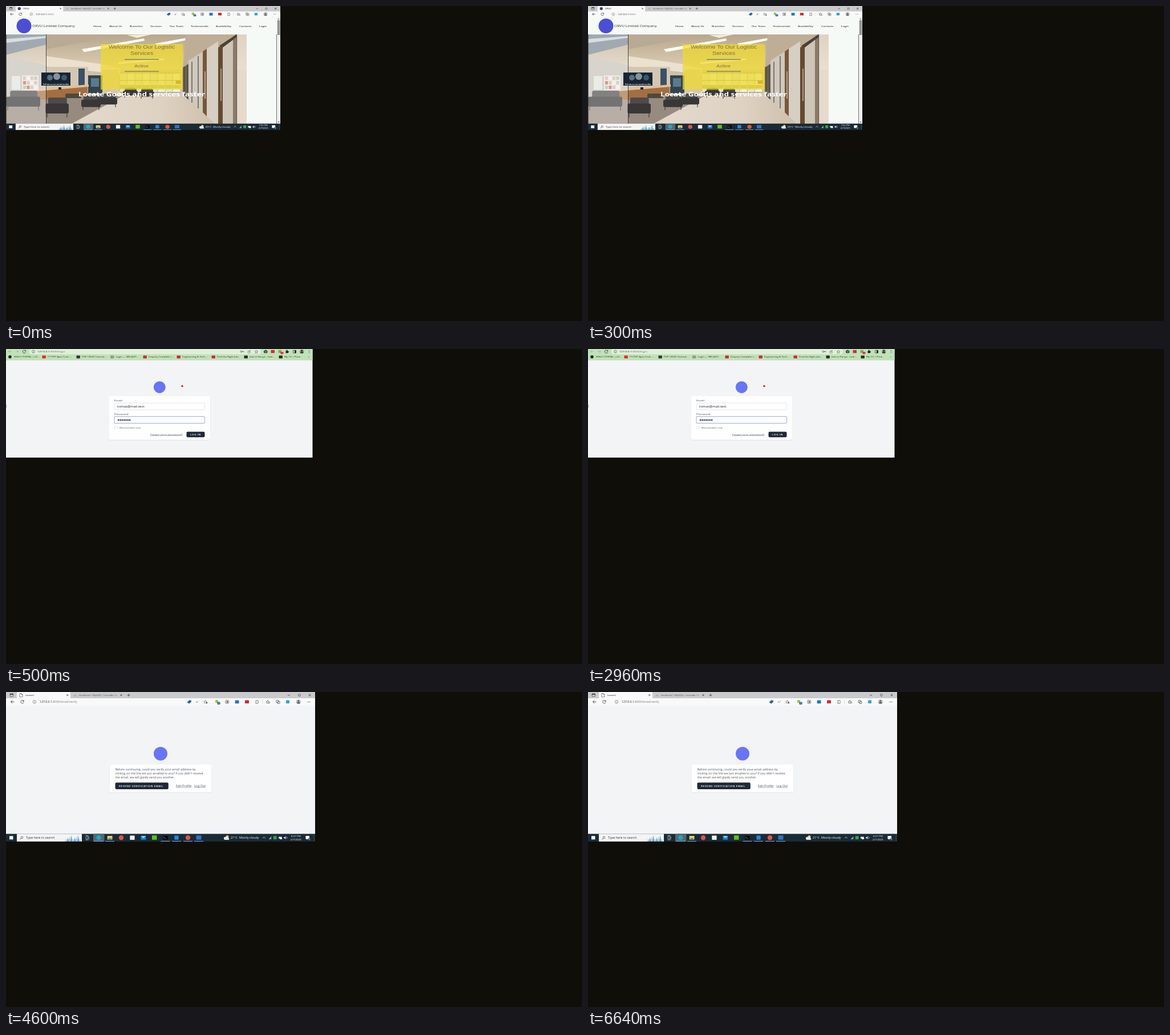
Recreate the animation shown at these times as an HTML page. Size 1010x554 px, loop 8 s.

```html
<!DOCTYPE html>
<html lang="en">
<head>
<meta charset="utf-8">
<style>
html, body { margin: 0; width: 100%; height: 100%; overflow: hidden; background: #0f0e09; }
svg { display: block; width: 1010px; height: 554px; font-family: "Open Sans", sans-serif; }
text { white-space: pre; }
</style>
</head>
<body>
<svg id="stage" viewBox="0 0 1010 554"></svg>
<script>
// Each screen is shown flattened; this is its height-to-width ratio.
let aspect = 1;
const rect = (x, y, w, h, fill, more = '') =>
  `<rect x="${x}" y="${y}" width="${w}" height="${h}" fill="${fill}" ${more}/>`;
const dot = (x, y, r, fill) => `<circle cx="${x}" cy="${y}" r="${r}" fill="${fill}"/>`;
const line = (d, color = '#333', width = 0.7) =>
  `<path d="${d}" fill="none" stroke="${color}" stroke-width="${width}"/>`;
const poly = (points, fill) => `<polygon points="${points}" fill="${fill}"/>`;
const text = (x, y, size, str, fill = '#333', more = '') =>
  `<text transform="translate(${x} ${y}) scale(1 ${aspect})" font-size="${size}" fill="${fill}" ${more}>${str}</text>`;
const box = (x, y, w, h, color = '#444') => rect(x, y, w, h, 'none', `stroke="${color}" stroke-width=".7" rx=".8"`);
const ring = (x, y, r, color = '#444') =>
  `<circle cx="${x}" cy="${y}" r="${r}" fill="none" stroke="${color}" stroke-width=".7"/>`;
const cross = (x, y, s, color) => line(`M${x - s} ${y - s}l${2 * s} ${2 * s}m0 ${-2 * s}l${-2 * s} ${2 * s}`, color, 0.8);
const reload = (x, y) => line(`M${x + 2.3} ${y - 1.4}A2.7 2.7 0 1 0 ${x + 2.6} ${y + 0.8}M${x + 2.7} ${y - 2.8}v2h-2`, '#333', 0.8);
const star = (x, y, color = '#555') =>
  line(`M${x} ${y - 2.8}l.9 1.9 2 .2-1.5 1.4.4 2-1.8-1-1.8 1 .4-2-1.5-1.4 2-.2z`, color, 0.6);
const dots = (x, y, dx, dy) => [-1, 0, 1].map(i => dot(x + i * dx, y + i * dy, 0.6, '#333')).join('');
const middle = 'text-anchor="middle"';
const bold = 'font-weight="600"';
const dark = '#1f2937', grey = '#4b5563', indigo = '#6875f5';

const button = (x, y, w, h, size, label) => rect(x, y, w, h, dark, 'rx="2.2"') +
  text(x + 6.6, y + h / 2 + size * aspect * 0.36, size, label, '#fff', `${bold} letter-spacing=".1em"`);
const link = (x, y, size, label) => text(x, y, size, label, grey, 'text-decoration="underline"');
const card = (x, y, w, h) => rect(x, y + 1, w, h, '#000', 'rx="3.5" opacity=".06"') +
  rect(x - 0.5, y + 0.5, w + 1, h, '#000', 'rx="3.5" opacity=".04"') + rect(x, y, w, h, '#fff', 'rx="3.5"');

function tabBar(title, icon, path) {
  return rect(0, 0, 542, 11, '#c9cacb') + box(7, 3, 5.5, 5) + rect(7, 3, 5.5, 1.6, '#333') +
    rect(19, 0, 94, 12, '#f9f9f9', 'rx="1.5"') + icon +
    text(33.5, 7, 4.6, title, '#222') + cross(107.7, 5.5, 1.4, '#222') +
    poly('117,7.5 121,4 125,7.5', '#b0b0b0') +
    text(128, 7, 4.8, 'localhost / MySQL / orvudb / c', '#555') + cross(202, 5.5, 1.4, '#222') +
    line('M212.5 5.5h5M215 3v5') + line('M494 5.7h4') + box(512.7, 3.8, 3.4, 3.4) + cross(532.6, 5.5, 1.8, '#222') +
    rect(0, 11, 542, 13, '#f9f9f9') + line('M14.5 17.3h-6l2.8-2.6m-2.8 2.6l2.8 2.6', '#333', 0.8) + reload(28.5, 17.3) +
    ring(50, 17.3, 2.8, '#777') + line('M50 16.8v2.1m0-3.4v.6', '#666') +
    text(59, 18.9, 5.2, `127.0.0.1<tspan fill="#7a7a7a">:8000${path}</tspan>`, '#222') +
    poly('317.5,18 321.5,14.3 325,15 324.5,18 321,20.5', '#1668c1') +
    text(333, 19, 5, 'A', '#777') + line('M337 15q1.5 1 0 2', '#777', 0.5) + star(349.5, 17.2) + dot(352, 19, 1.3, '#555') +
    rect(367, 14, 5, 5, '#a8c431', 'rx="1"') + rect(370.5, 17.5, 5, 4.5, '#1667c9', 'rx=".8"') +
    text(373, 21.2, 3.8, '3', '#fff', middle) +
    box(385, 14.6, 5.5, 5.4) + rect(387, 16, 2, 2.8, '#444') + rect(401.7, 14.4, 6.8, 5.8, '#1677d8', 'rx="1"') +
    rect(419, 14.6, 7, 5.4, '#da2530', 'rx=".6"') + line('M438 15h4v1.5q1.8.9 0 1.8V20h-4v-1.6q1.4-1 0-2z', '#444') +
    line('M449.7 14v7', '#ccc') + star(459, 17.3, '#333') + line('M461 19h2.5', '#333') +
    box(474, 14.5, 4.2, 4.2) + box(475.8, 16.3, 4.2, 4.2) + rect(491, 14.5, 6, 5.5, '#22a8cf', 'rx="1"') +
    dot(512.8, 17.3, 4, '#b7b9bd') + dot(512.8, 16, 1.4, '#565a60') + rect(510.3, 18, 5, 2.2, '#565a60', 'rx="1"') +
    dots(531, 17.3, 2.1, 0);
}

function taskBar(temperature, time) {
  const skyline = [0, 1, 2, 3, 4, 5, 6, 7, 8].map(i => {
    const h = 4 + (i * 5 % 4) * 2;
    return poly(`${104 + i * 3},263 ${105.5 + i * 3},${262 - h} ${107.5 + i * 3},263`, i % 2 ? '#5f9ec3' : '#9cc9df');
  }).join('');
  const running = [162.5, 182, 279.5, 299, 319, 338].map(x => rect(x - 8, 262, 16, 1, '#70b8e8')).join('');
  return rect(0, 249.5, 542, 13.5, '#1a2b38') + rect(6, 253.3, 6.5, 6, '#fff') +
    rect(19, 249.5, 114, 13.5, '#f3f4f4') + ring(28, 255.7, 1.8) + line('M26.8 257.2l-2.2 2.2', '#333', 0.8) +
    text(35, 258, 5.55, 'Type here to search', '#333') + skyline +
    box(140, 254, 3.6, 4.4, '#d5dbe0') + line('M145.2 253.5v6M139.5 252.5h5M139.5 260h5', '#d5dbe0') +
    rect(153, 249.5, 19.5, 13.5, '#526872') + running +
    dot(162.5, 256, 4.2, '#22a5bd') + rect(177.7, 253, 8.8, 6.6, '#f5c84c', 'rx=".6"') + rect(179.5, 257, 5.2, 2.6, '#3e8ed0') +
    dot(202, 256.3, 4.2, '#dc5544') + rect(217.3, 252.5, 8.3, 7.4, '#eef1f3', 'rx=".7"') +
    rect(236.5, 253.3, 8.8, 6.4, '#1683d5', 'rx=".6"') + poly('236.5,253.3 245.3,253.3 241,257', '#9ad7f8') +
    rect(256, 252.2, 8.5, 7.6, '#5fc218') +
    rect(275.2, 253, 8.8, 6.7, '#080a0c') + line('M276.3 255l1.5 1-1.5 1M278.5 257.6h2', '#eee', 0.5) +
    rect(295.3, 252.4, 7.4, 7.4, '#2787d2', 'rx="1"') + dot(319, 256.3, 4.2, '#dc5544') +
    rect(333.5, 252.3, 9, 7.5, '#2e72c8', 'rx=".7"') +
    dot(388, 254.5, 2.5, '#efb344') + dot(384.5, 257.3, 2.6, '#dfe8f1') + dot(387.5, 256.7, 2.8, '#dfe8f1') +
    rect(383, 257.3, 8.3, 2.7, '#dfe8f1', 'rx="1.3"') +
    text(394, 258.2, 5.4, temperature + '°C', '#fff') + text(409, 258.2, 5.4, 'Mostly cloudy', '#fff') +
    line('M450 257.2l2.4-2.2 2.4 2.2', '#fff') + poly('460.5,259 465.3,259 465.3,253.5', '#8e9aa2') +
    rect(468.8, 253.3, 5.8, 5.8, '#2fa83c') + rect(478, 254.5, 5.7, 3.3, '#d5dbe0') + rect(480.2, 256.2, 3.7, 2.7, '#fff') +
    poly('487,255.5 488.5,255.5 490.5,253.5 490.5,259 488.5,257.3 487,257.3', '#dce1e5') + line('M492 254.5q1.8 1.7 0 3.5', '#dce1e5') +
    text(508.3, 254.7, 4.5, time, '#fff', middle) + text(508.3, 261, 4.5, '2/7/2023', '#fff', middle) +
    poly('525.5,253 532,253 532,258.5 529,258.5 527.5,260 527.5,258.5 525.5,258.5', '#fff') +
    dot(532, 259.2, 2.3, '#34444f') + text(532, 260.4, 3.6, '2', '#fff', middle) + line('M540.3 250v13', '#5d6871', 0.5);
}

const chair = (x, y, w, h) => rect(x + w * 0.12, y, w * 0.8, h * 0.65, '#4d4a49', 'rx="3"') +
  rect(x, y + h * 0.3, w, h * 0.5, '#383637', 'rx="3"') +
  line(`M${x + 3} ${y + h * 0.8}v${h * 0.2}m${w - 6} 0v${-h * 0.2}`, '#302c2a', 1);

function lobby() {
  const fade = (id, dir, ...stops) => `<linearGradient id="${id}" x2="${dir[0]}" y2="${dir[1]}">` +
    stops.map((color, i) => `<stop offset="${i / (stops.length - 1)}" stop-color="${color}"/>`).join('') + '</linearGradient>';
  let s = fade('ceiling', [0, 1], '#b9a78d', '#dccfb6') + fade('floor', [1, 0], '#b5a999', '#e2d9cb', '#ded2c2', '#c9b8a2');
  s += rect(0, 50, 422, 157, '#cdbfa9') + rect(0, 50, 422, 62, 'url(#ceiling)') +
    poly('0,50 70,50 70,68 0,86', '#78858f') + poly('0,58 70,53 70,56 0,65', '#c8d0d3') +
    poly('70,50 180,50 145,62 70,76', '#b9aa94') + poly('70,88 165,102 200,110 200,120 70,106', '#ebe1ce') +
    poly('133,76 242,57 243,61 137,81', '#fffdf4') + poly('262,66 350,50 362,50 266,71', '#fffdf4') +
    poly('196,99 277,92 278,95 198,102', '#fffbe9') + poly('212,51 255,50 230,56', '#f6ecd6') +
    poly('315,50 404,50 404,53 310,110', '#bfae96') +
    poly('0,88 70,104 70,164 0,176', '#c6c1b8') + rect(70, 107, 74, 44, '#d3c7b3');
  s += poly('0,174 70,162 200,150 310,150 404,207 0,207', 'url(#floor)') +
    poly('0,175 80,160 205,158 115,207 0,207', '#978b7f') +
    rect(127, 110, 11, 35, '#3a5265') + rect(144, 122, 25, 32, '#35434b') + rect(149, 127, 14, 15, '#587b91') +
    rect(169, 112, 29, 43, '#d6c8ad') + poly('40,148 143,139 143,158 70,165 40,162', '#a36f41') +
    poly('40,147 145,138 145,142 40,151', '#dfc09a') + rect(92, 143, 5, 4, '#222');
  for (let i = 0; i < 8; i++) s += rect(200 + i * 13.3, 118, 12, 34, i % 2 ? '#eef3e4' : '#dfe8d5') + rect(200 + i * 13.3, 139, 12, 6, '#a9b687');
  s += line('M200 118h106M200 131h106M200 152h106', '#79745f', 0.9) +
    rect(10, 123, 15, 24, '#e2e2de') + rect(28, 122, 29, 26, '#e6e3dc');
  for (let i = 0; i < 12; i++) s += rect(30 + i % 4 * 6.5, 124 + (i >> 2) * 8, 5, 6, ['#d3b7a9', '#a9c2a5', '#f0eee6', '#c46c59'][i * 7 % 5 % 4]);
  s += chair(0, 149, 60, 35) + chair(69, 161, 41, 35) + chair(132, 157, 34, 26) + chair(160, 154, 35, 24) +
    chair(205, 144, 26, 17) + chair(234, 145, 26, 18) + rect(104, 154, 28, 8, '#4e4842', 'rx="2"');
  // glass partition on the right
  s += poly('310,108 320,102 320,165 310,155', '#6e6458') + poly('320,96 345,80 345,187 320,166', '#cfc8bc') +
    poly('345,80 352,75 352,194 345,187', '#79573b') + poly('352,75 372,62 372,207 366,207 352,194', '#d5cfc4') +
    poly('372,73 380,68 380,207 372,207', '#65492f') + poly('380,68 398,54 398,207 380,207', '#cdc5b8') +
    poly('398,54 404,50 404,207 398,207', '#8d7a66') + line('M313 107v51M318 103v60M326 98v72M337 88v92', '#4b4138', 1.2) +
    line('M349 115v48M377 110v57', '#dad8ce', 1.2) + poly('374,70 404,50 404,55 380,73', '#4b4034') +
    rect(297.5, 131, 9, 6, '#8a5c2b') + rect(0, 50, 70, 157, '#fff', 'opacity=".3"') +
    rect(62, 117, 51, 23, '#172532') + dot(77, 126, 5, '#587286') + dot(89, 124, 6, '#8294a0') + dot(102, 126, 5, '#395970') +
    text(87.5, 138.7, 3.7, 'Follow us on social media', '#fff', `${middle} ${bold}`) +
    rect(404, 50, 18, 157, '#efe6da', 'opacity=".7"');
  return s;
}

function homePage() {
  const nav = { Home: 153, 'About Us': 181, Branches: 217, Services: 253, 'Our Team': 287, Testimonials: 324, Availability: 368, Contacts: 409, Login: 444 };
  const arial = `${middle} font-family="Liberation Sans, Arial, sans-serif"`;
  aspect = 0.87;
  const chrome = tabBar('ORVU', rect(23.5, 2.8, 5.5, 5.5, '#363a83', 'rx="1"'), '') + taskBar(25, '7:52 PM');
  aspect = 0.81;
  return rect(0, 19, 481, 190, '#f5faf6') + dot(31.5, 35, 13, '#4b50d2') +
    text(46, 37, 6.65, 'ORVU Limited Company.', '#333') +
    Object.entries(nav).map(([label, x]) => text(x, 37, 5.1, label, '#444', bold)).join('') + lobby() +
    line('M.3 50v157M70.5 50v157M404.6 50v157M474.7 50v157', '#282725', 0.8) +
    rect(166, 67, 144, 80, '#f1da2c', 'opacity=".72"') +
    text(238, 75.4, 10.5, 'Welcome To Our Logistic', '#7c7148', arial) + text(238, 85.8, 10.5, 'Services', '#7c7148', arial) +
    text(237.5, 108, 9.2, 'Active', '#7c7148', arial) + line('M208 94h60M208 115h60', '#7c8975', 1.5) +
    text(238, 159.4, 13.6, 'Locate Goods and services faster', '#fff', `${middle} font-weight="700"`) +
    rect(475, 20, 6, 187, '#f0f0f0') + rect(475.8, 25, 4.6, 26, '#949494') +
    poly('476.3,23.5 478,21.7 479.7,23.5', '#666') + poly('476.3,203.5 478,205.3 479.7,203.5', '#444') +
    `<g transform="scale(.8875 .829)">${chrome}</g>`;
}

function loginPage() {
  aspect = 0.75;
  const bookmarks = [
    [14, 'RDKLT PORTAL | LO...', '#222'], [73, '(*) PHP Ajax Crud -...', '#e02a28'], [133, 'PHP CRUD Tutorial...', '#333'],
    [192.5, 'Login — NM-AIST...', '#8d9c91'], [250, 'Enquiry Complete |...', '#cf2637'], [309, 'Engineering &amp; Tech...', '#cf2637'],
    [370, 'Find the Right Job...', '#cf2637'], [427, 'Jobs in Kenya - Late...', '#2c2820'], [488, 'My CV | Pimo', '#2c2820']];
  const field = (y, color, width) => rect(190, y, 158.5, 12, '#fff', `rx="2.2" stroke="${color}" stroke-width="${width}"`);
  let s = rect(0, 0, 537.5, 191, '#f3f4f6') + rect(0, 0, 537.5, 20, '#c0e2b7') + rect(41, 0, 406, 9.2, '#dff0d9', 'rx="4"') +
    line('M9.5 4.5h-5l2.3-2.3m-2.3 2.3l2.3 2.3M17 4.5h5l-2.3-2.3m2.3 2.3l-2.3 2.3', '#94ad90') + reload(32, 4.6) +
    ring(48, 4.5, 2.5, '#566') + line('M48 4.2v1.8m0-3v.6', '#566') +
    text(55, 6.1, 5.2, '127.0.0.1<tspan fill="#667066">:8000/login</tspan>', '#222') +
    ring(412.5, 4.5, 1.4) + line('M414 4.5h3v1.3') + box(424, 3.7, 4.2, 3.4, '#566') + line('M426 5q0-2.5 3-2.7', '#566') + star(439, 4.8) +
    poly('452,3 455.3,1.5 458.5,3 458.5,6.2 455.3,7.8 452,6.2', '#35423b') + line('M452.5 3.2l2.8 1.4 2.8-1.4m-2.8 1.4v3', '#c0e2b7', 0.6) +
    rect(464.5, 1.8, 6.5, 5.3, '#e0262e') + rect(477.5, 1.8, 5.5, 5, '#91a34b') + rect(481.5, 4.9, 5, 4, '#d93025', 'rx=".8"') +
    text(484, 8, 3.2, '13', '#fff', middle) + rect(490.5, 3.2, 4.3, 4, '#222') + dot(492.6, 2.6, 1, '#222') + dot(495, 5, 1, '#222') +
    box(503.4, 2.3, 5.2, 4.8, '#222') + rect(506, 2.3, 2.6, 4.8, '#222') +
    dot(518.7, 4.5, 3.8, '#8fa58d') + dot(518.7, 3, 1.7, '#43352e') + rect(516, 4.8, 5.4, 2.7, '#43352e', 'rx="1.3"') + dots(531.5, 4.5, 0, 2);
  for (const [x, label, color] of bookmarks) {
    s += (color === '#222' ? dot(x - 7, 13.8, 2.8, color) : rect(x - 9.5, 11.4, 6.4, 5, color, 'rx=".6"')) + text(x, 15.1, 4.5, label, '#333');
  }
  s += text(529.5, 15.1, 5, '»') + dot(269.3, 67.2, 10.5, indigo) + dot(309, 65.2, 1.7, '#f01616') + box(-1, 98, 1.7, 5, '#777') +
    card(180.5, 83, 177.5, 76.7) + text(190, 92.1, 5.5, 'Email', '#374151') + field(95, '#d1d5db', 0.6) +
    text(195, 102.6, 6.1, 'tomas@mail.test', '#222') + text(190, 115.8, 5.5, 'Password', '#374151') + field(118.7, '#a9b5fa', 1.2);
  for (let i = 0; i < 7; i++) s += dot(197 + i * 3.35, 124.9, 1.2, '#111');
  return s + rect(190.2, 136, 5.5, 4, '#fff', 'rx="1" stroke="#d1d5db" stroke-width=".6"') + text(199, 139.5, 5.35, 'Remember me', grey) +
    link(253, 151.7, 5.35, 'Forgot your password?') + button(316.5, 145.5, 32, 9.8, 4.7, 'LOG IN');
}

function verifyPage() {
  aspect = 0.87;
  const message = ['Before continuing, could you verify your email address by',
    "clicking on the link we just emailed to you? If you didn't receive", 'the email, we will gladly send you another.'];
  const page = line('M24 2.5h3l2 2v4.3h-5zM27 2.5v2h2', '#555');
  return rect(0, 24, 542, 226, '#f3f4f6') + tabBar('Laravel', page, '/email/verify') +
    dot(271, 108.5, 12, indigo) + card(182, 127.7, 178, 48.8) +
    message.map((row, i) => text(191.7, 138 + i * 6.9, 5.3, row, grey)).join('') +
    button(191.5, 159.3, 93.3, 11.6, 4.75, 'RESEND VERIFICATION EMAIL') +
    link(298, 166.8, 5.45, 'Edit Profile') + link(330.3, 166.8, 5.45, 'Log Out') + taskBar(21, '8:27 PM');
}

const stage = document.getElementById('stage');
stage.innerHTML = [homePage, loginPage, verifyPage].map(draw => `<g>${draw()}</g>`).join('');
const scenes = [...stage.children];
function show() {
  const time = performance.now() % 8000;
  const current = time < 500 ? 0 : time < 4600 ? 1 : 2;
  scenes.forEach((scene, i) => scene.setAttribute('visibility', i === current ? 'visible' : 'hidden'));
  requestAnimationFrame(show);
}
show();
</script>
</body>
</html>
```
